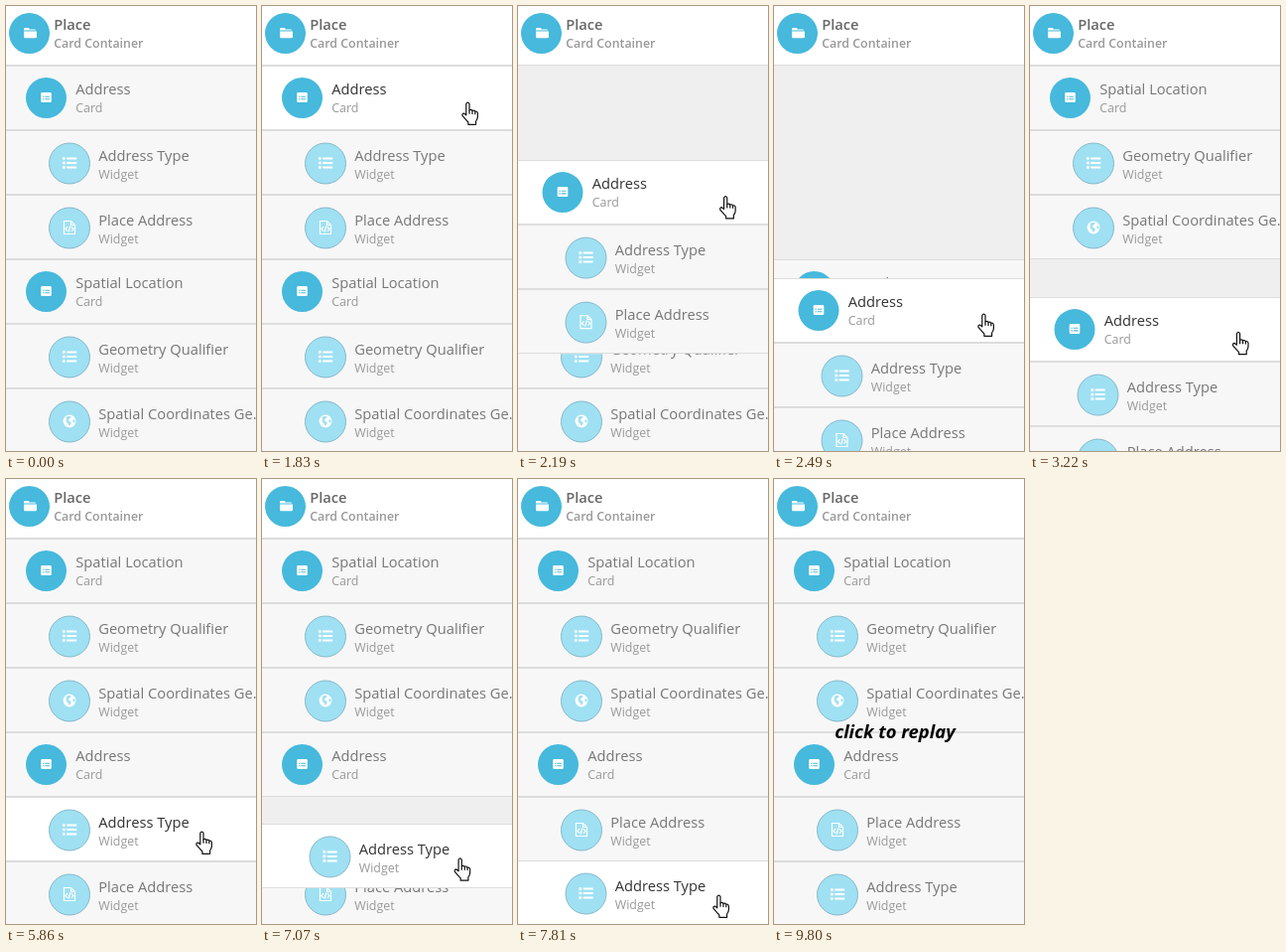
An HTML page for the animation above (9.88 s loop, 252 by 448 pixels).

```html
<!DOCTYPE html>
<html lang="en">
<head>
<meta charset="utf-8">
<title>Reordering cards</title>
<style>
  html, body { margin: 0; width: 100%; height: 100%; overflow: hidden; background: #efefef; }
  svg { display: block; width: 100%; height: 100%; }
  text { font-family: "Open Sans", "Noto Sans", sans-serif; }
  .title { font-size: 14.7px; fill: #777; }
  .sub { font-size: 12.4px; fill: #999; }
  .head text { font-weight: 600; }
  .head .title { fill: #686868; }
  .bg { fill: #f7f7f7; }
  .line { fill: #dcdcdc; }
  .hover .bg { fill: #fff; }
  .hover .title { fill: #333; }
  .disc { fill: #46b9dc; }
  .pale { fill: #9fe0f3; stroke: #7fb3c6; stroke-width: .9; }
  .replay { font: italic 700 18.4px "Open Sans", "Noto Sans", sans-serif; text-anchor: middle; }
</style>
</head>
<body>
<svg id="stage" viewBox="0 0 252 448">
  <defs>
    <g id="folder" fill="#fff">
      <path d="M-6.5-4q0-1.2 1.2-1.2h3.2q1 0 1.2 1.4h5.4q1 0 1 1H-6.5z"/>
      <path d="M-6.5-1.9h13v5.700q0 1.200-1.200 1.200h-10.600q-1.200 0-1.200-1.200z"/>
    </g>
    <g id="card">
      <rect x="-5.300" y="-5" width="10.600" height="10" rx="1.300" fill="#fff"/>
      <path d="M-3.500-.8h1.400M-1.200-.8h4.600M-3.500 1.800h1.400M-1.200 1.800h4.600" stroke="#46b9dc" stroke-width="1.100"/>
    </g>
    <g id="list" stroke="#fff">
      <path d="M-7-4.500h2.700M-7 0h2.700M-7 4.500h2.700" stroke-width="2.700"/>
      <path d="M-2.800-4.500h10M-2.800 0h10M-2.800 4.500h10" stroke-width="2"/>
    </g>
    <g id="code" fill="none" stroke="#fff" stroke-width="1.200">
      <path d="M-5.500-6.500h7l4 4v9h-11zM1.500-6.500v4h4"/>
      <path d="M-2-.8l-2 2.200 2 2.200M2-.8l2 2.200-2 2.200M.8-1.500l-1.600 6"/>
    </g>
    <g id="globe">
      <circle r="6.400" fill="#fff"/>
      <path d="M-3-4.500l3.500-.8 1.200 1.500-2 1.300-1 2.200 2.200.8 1 1.700-2.200 2.800-1.200-2.800-2-1.700zM3.200-1.800l2.400.6-.3 3-1.600-.8z" fill="#9fe0f3"/>
    </g>
  </defs>
  <g id="rows"></g>
  <g class="head">
    <rect width="252" height="59" fill="#fff"/>
    <rect class="line" y="59" width="252" height="1"/>
    <circle class="disc" cx="23.500" cy="27.500" r="20.500"/>
    <use href="#folder" x="24.500" y="27.300"/>
    <text class="title" x="48.200" y="23.500">Place</text>
    <text class="sub" x="48.200" y="42">Card Container</text>
  </g>
  <g id="cursor" fill="#fff" stroke="#111" stroke-width="1.200" stroke-linejoin="round">
    <path d="M4.800 2.300Q6.400-.2 8 2.300V8.800Q9.800 7.900 11 9.300Q12.800 8.600 13.800 10.200Q15.900 9.700 16.400 11.800V15.600Q16.200 18 14.600 20V23.300H6.900V21Q4.500 18.500 1 14.400Q.5 12 2.600 12L4.800 13.800Z"/>
    <path fill="none" d="M8 8.800V12.800M11 9.300V12.900M13.800 10.200V13.200"/>
  </g>
  <text id="replay" class="replay" x="122" y="260.500">click to replay</text>
</svg>
<script>
const LOOP = 9880, TOP = 60, ROW = 65, GROUP = 3 * ROW, DRAG_X = 4.5;
const el = id => document.getElementById(id);

function makeRow(title, sub, icon) {
  const card = sub === 'Card';
  const x = card ? 40.5 : 64, y = card ? 32.5 : 33.5;
  const textX = card ? 70.3 : 93.2, base = card ? 29 : 31;
  const g = document.createElementNS('http://www.w3.org/2000/svg', 'g');
  g.innerHTML = `<rect class="bg" width="252" height="65"/>
    <rect class="line" width="252" height="1"/>
    <rect class="line" y="64" width="252" height="1"/>
    <g class="body">
      <circle class="${card ? 'disc' : 'pale'}" cx="${x}" cy="${y}" r="20.5"/>
      <use href="#${icon}" x="${x}" y="${y - .5}"/>
      <text class="title" x="${textX}" y="${base}">${title}</text>
      <text class="sub" x="${textX}" y="${base + 18}">${sub}</text>
    </g>`;
  el('rows').append(g);
  return { g, body: g.querySelector('.body') };
}

const spatial = makeRow('Spatial Location', 'Card', 'card');
const geometry = makeRow('Geometry Qualifier', 'Widget', 'list');
const coords = makeRow('Spatial Coordinates Ge...', 'Widget', 'globe');
const address = makeRow('Address', 'Card', 'card');
const place = makeRow('Place Address', 'Widget', 'code');
const type = makeRow('Address Type', 'Widget', 'list');
const rows = [spatial, geometry, coords, address, place, type];

// start, end, steps, then the pointer x, y and drag distance reached
const moves = [
  [845, 1140, 4, 201, 94, 0],
  [1800, 1830, 1, 201, 96, 0],
  [1830, 2490, 9, 205, 309, 214],
  [2490, 2790, 4, 204, 352, 256],
  [2790, 3660, 12, 203, 293, 201],
  [3890, 3970, 1, 203, 288, 196],
  [3970, 4050, 1, 201, 283, 192],
  [4220, 4340, 2, 190, 266, 0],
  [4570, 4810, 3, 196, 273, 0],
  [5428, 5860, 6, 191, 354, 0],
  [6630, 7590, 13, 197, 424, 70],
  [7590, 7810, 3, 196, 418, 64],
  [8040, 8200, 2, 189, 409, 0],
  [8280, 8570, 4, 187, 404, 0],
  [8950, 9190, 3, 256, 412, 0]
];

function pointerAt(t) {
  let pos = [256, 84, 0];
  for (const [start, end, steps, ...goal] of moves) {
    if (t < start) break;
    const p = Math.min(1, Math.floor((t - start) / (end - start) * steps + .02) / steps);
    pos = pos.map((v, i) => v + (goal[i] - v) * p);
  }
  return pos;
}

function put(row, y, dragged) {
  row.y = y;
  row.g.setAttribute('transform', `translate(0 ${y})`);
  row.body.setAttribute('transform', `translate(${dragged ? DRAG_X : 0} 0)`);
}

function draw(t) {
  const [x, y, lift] = pointerAt(t);
  const groupDrag = t >= 1895 && t < 4280;
  const rowDrag = t >= 6695 && t < 7970;
  const groupsSwapped = t >= 2790, rowsSwapped = t >= 7590;

  const spatialY = groupsSwapped ? TOP : TOP + GROUP;
  [spatial, geometry, coords].forEach((row, i) => put(row, spatialY + i * ROW));

  const addressY = groupDrag ? TOP + lift : groupsSwapped ? TOP + GROUP : TOP;
  const typeY = rowDrag ? addressY + ROW + lift : addressY + (rowsSwapped ? 2 : 1) * ROW;
  put(address, addressY, groupDrag);
  put(place, addressY + (rowsSwapped ? 1 : 2) * ROW, groupDrag);
  put(type, typeY, groupDrag || rowDrag);

  const under = x < 250 && rows.find(r => y + 1 >= r.y && y + 1 < r.y + ROW);
  const hovered = groupDrag ? address : rowDrag ? type : under;
  rows.forEach(r => r.g.classList.toggle('hover', r === hovered));

  el('cursor').setAttribute('transform', `translate(${x} ${y})`);
  el('replay').style.display = t >= 9800 ? '' : 'none';
}

const begin = performance.now();
function tick() {
  draw((performance.now() - begin) % LOOP);
  requestAnimationFrame(tick);
}
tick();
</script>
</body>
</html>
```
